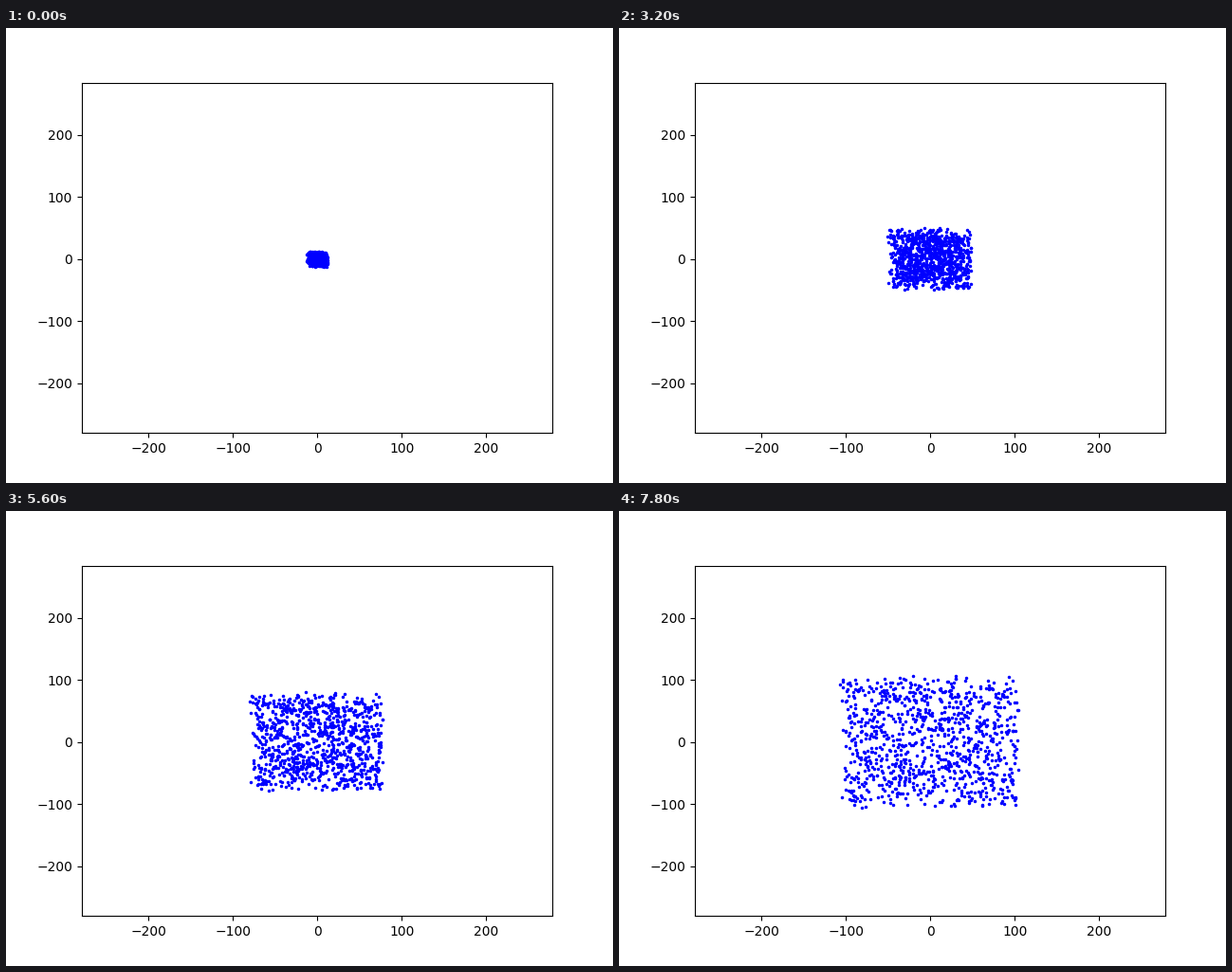
Recreate the animation shown at these times as a matplotlib script. Size 640 px wide and 480 px high, loop 8000 ms.

```python
import numpy as np
import matplotlib.pyplot as plt
from matplotlib.animation import FuncAnimation

FRAMES, INTERVAL = 40, 200
COUNT = 1000
START, SPEED = 10, 2.5  # half-widths of the uniform start square and velocities

rng = np.random.default_rng(7)
start = rng.uniform(-START, START, (COUNT, 2))
velocity = rng.uniform(-SPEED, SPEED, (COUNT, 2))

fig, ax = plt.subplots(figsize=(6.4, 4.8), dpi=100)
ax.set_xlim(-279, 278.5)
ax.set_ylim(-280, 284.5)
dots, = ax.plot([], [], "b.", markersize=3)


def update(frame):
    """Every particle drifts in a straight line, one step ahead of the frame."""
    dots.set_data(*(start + velocity * (frame + 1)).T)
    return dots,


anim = FuncAnimation(fig, update, frames=FRAMES, interval=INTERVAL,
                     init_func=lambda: update(0), repeat=True, repeat_delay=0)
plt.show()
```
